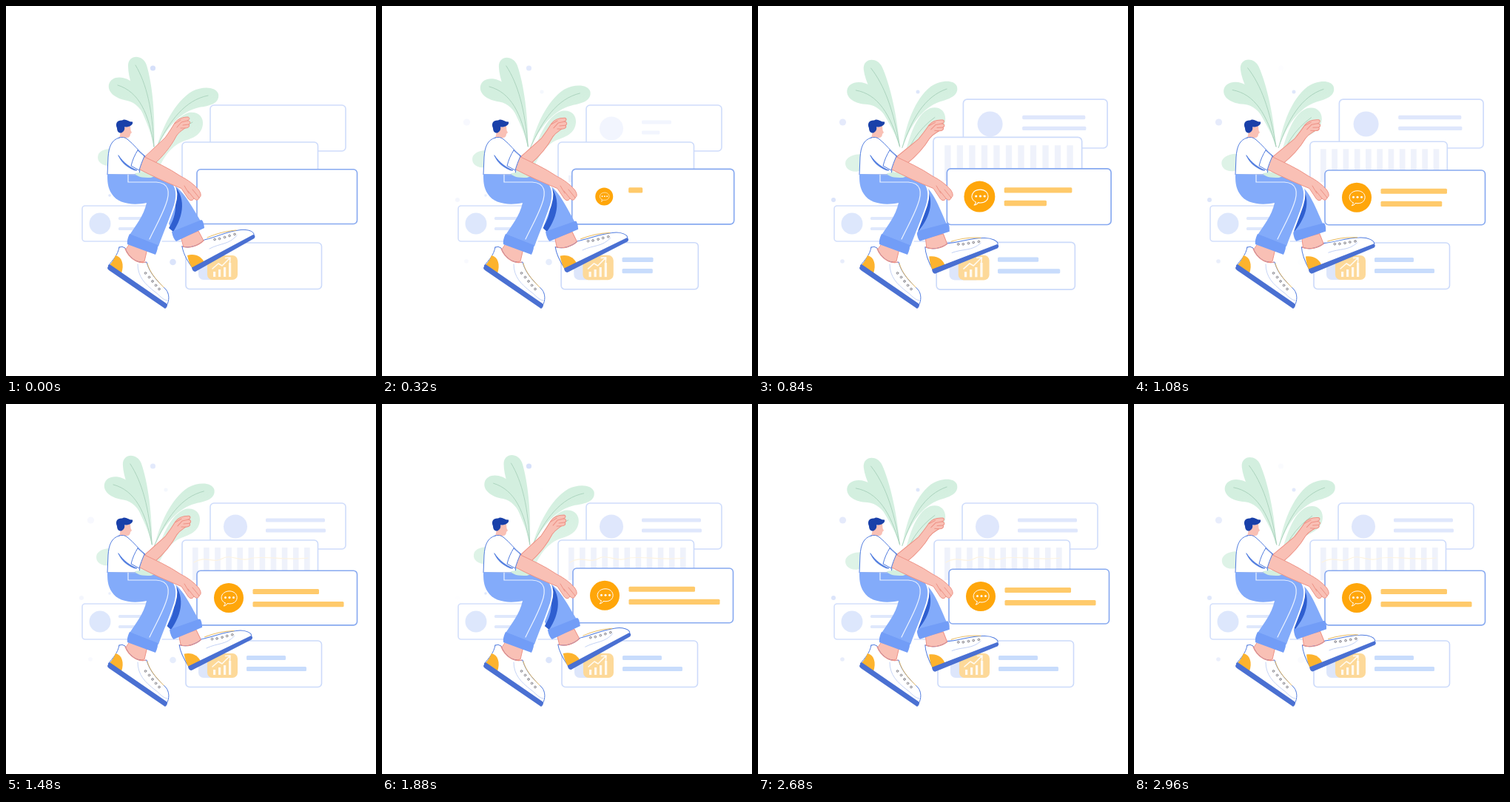
An HTML page with a canvas that plays this animation: 500 by 500 pixels, repeating every 3 s.

```html
<!DOCTYPE html>
<html lang="en">
<head>
<meta charset="utf-8">
<title>Floating cards</title>
<style>
html, body { margin: 0; width: 100%; height: 100%; overflow: hidden; background: #fff; }
canvas { display: block; width: 100vw; height: 100vh; }
</style>
</head>
<body>
<canvas id="stage"></canvas>
<script>
const SIZE = 500, LOOP = 3000, STEP = 40;
const canvas = document.getElementById('stage');
const ratio = Math.max(1, window.devicePixelRatio || 1);
canvas.width = canvas.height = SIZE * ratio;
const ctx = canvas.getContext('2d');

const SKIN = '#f9c0b5', SKIN_LINE = '#ee9286', BLUE = '#4f7bdf';
const JEANS = '#83abfa', CUFF = '#729df7', FOLD = '#2f5fd0';
const SOLE = '#4a70d2', AMBER = '#fdb32e', LEAF = '#d3efdf', VEIN = '#a9d2bc';

const clamp = v => Math.min(1, Math.max(0, v));
const ramp = (t, a, b) => clamp((t - a) / (b - a));
const ease = v => (1 - Math.cos(Math.PI * clamp(v))) / 2;
const hump = (t, a, b) => Math.sin(Math.PI * ramp(t, a, b)) ** 2;

// 1 at the upper pose, 0 at the lower one, with a short rest below
function sway(t) {
  const p = t % 1800;
  return p < 900 ? 1 - ease(p / 840) : ease((p - 960) / 840);
}

function shape(d, fill, stroke, width = 1) {
  const path = new Path2D(d);
  if (fill) { ctx.fillStyle = fill; ctx.fill(path); }
  if (stroke) { ctx.strokeStyle = stroke; ctx.lineWidth = width; ctx.stroke(path); }
}

function disc(x, y, r, fill, stroke, width = 1) {
  ctx.beginPath();
  ctx.arc(x, y, r, 0, Math.PI * 2);
  if (fill) { ctx.fillStyle = fill; ctx.fill(); }
  if (stroke) { ctx.strokeStyle = stroke; ctx.lineWidth = width; ctx.stroke(); }
}

function box(x, y, w, h, r, fill, stroke, width = 1.6) {
  ctx.beginPath();
  ctx.roundRect(x, y, w, h, r);
  if (fill) { ctx.fillStyle = fill; ctx.fill(); }
  if (stroke) { ctx.strokeStyle = stroke; ctx.lineWidth = width; ctx.stroke(); }
}

function bar(x, y, w, h, fill) {
  if (w > 0.5) box(x, y - h / 2, w, h, Math.min(1.5, w / 2), fill);
}

function group(draw, { alpha = 1, x = 0, y = 0, px = 0, py = 0, scale = 1, turn = 0 } = {}) {
  ctx.save();
  ctx.globalAlpha *= alpha;
  ctx.translate(px + x, py + y);
  ctx.rotate(turn * Math.PI / 180);
  ctx.scale(scale, scale);
  ctx.translate(-px, -py);
  draw();
  ctx.restore();
}

function sideCard() {
  box(103, 270, 137, 48, 4, '#fff', '#d3dffb');
  disc(127, 294, 14.5, '#dde7fc');
  bar(152, 287, 50, 4, '#dfe8fc');
  bar(152, 301, 50, 4, '#dfe8fc');
}

function profileCard(t) {
  const k = hump(t, 480, 1440);
  group(() => {
    box(276, 134, 183, 62, 5, '#fff', '#cfdcfb');
    group(() => {
      disc(310, 165.5, 16, '#dfe7fc');
      bar(351, 157, 80 * ramp(t, 120, 520), 5, '#dfe7fc');
      bar(351, 171, 81 * ramp(t, 200, 600), 5, '#dfe7fc');
    }, { alpha: ramp(t, 160, 560) });
  }, { px: 367.5, py: 165, scale: 1 + 0.075 * k, x: 8.5 * k, y: -7 * k });
}

function chartCard(t) {
  const k = hump(t, 400, 1160);
  group(() => {
    box(238, 184, 183.5, 62, 5, '#fff', '#cddbfa');
    for (let i = 0; i < 11; i++) {
      const h = 44 * ease(ramp(t, 200 + (i % 2) * 60, 600 + (i % 2) * 60));
      ctx.fillStyle = '#eff2fb';
      ctx.fillRect(252 + i * 15.1, 238 - h, 7.6, h);
    }
    group(() => shape('M254 214 C270 204 280 216 292 209 S316 214 330 209 S380 212 408 208', null, '#fdf3e0', 1.2),
      { alpha: ramp(t, 1100, 1400) });
  }, { px: 329.5, py: 215, scale: 1 + 0.1 * k, x: 8 * k, y: -4 * k });
}

function bubble() {
  shape('M296 264.500 C287 260 291 248.500 302 248.500 C315 248.500 316 265.500 302 265.500 L299 265.200 C298 267.500 296 268.500 294 268.500 C296 267 296.500 266 296 264.500 Z', null, '#fff', 1);
  for (const x of [296.5, 302, 307.5]) disc(x, 257, 1.5, '#fff');
}

function messageCard(t) {
  const k = hump(t, 240, 960);
  const drift = t < 740 ? 0 : 4.4 * Math.abs(Math.sin(Math.PI * (t - 740) / 1480)) ** 3;
  group(() => {
    box(258, 220.8, 216.5, 73.7, 5, '#fff', '#87a9f0', 1.6);
    group(() => {
      disc(301, 257.5, 20, '#ffa60a');
      bubble();
    }, { px: 301, py: 257.5, scale: ease(ramp(t, 120, 480)) * (1 + 0.09 * k) });
    bar(333.5, 249, 89.5 * ramp(t, 200, 770), 7, '#ffca6b');
    bar(333.5, 266.2, 123 * ramp(t, 340, 1440), 7.2, '#ffca6b');
  }, { px: 366.5, py: 257.5, scale: 1 + 0.098 * k, y: drift });
}

function statsCard(t) {
  const k = hump(t, 240, 960);
  group(() => {
    box(243, 320, 183.5, 62.5, 5, '#fff', '#ccdafa');
    box(260, 344, 42, 26, 7, '#dde6fb');
    box(272, 337, 41, 33, 7, '#fdd999');
    ctx.fillStyle = '#fffaf0';
    [7, 10, 13, 19].forEach((h, i) => ctx.fillRect(280 + i * 7, 366 - h, 3.2, h));
    shape('M279 355 L287 348 L292 351 L302 341 M296.5 340.5 L303 340 L302.5 346.5', null, '#fffaf0', 1.6);
    group(() => {
      bar(325, 343, 53 * ramp(t, 40, 400), 6, '#c8dcfc');
      bar(325, 358, 81 * ramp(t, 120, 520), 6, '#c8dcfc');
    }, { px: 365.5, py: 351, scale: 1 + 0.08 * k });
  }, { px: 334.7, py: 351.2, scale: 1 + 0.08 * k });
}

function dots(s) {
  group(() => {
    disc(198.5, 84, 3.6, '#d6e0fa');
    disc(225.5, 346, 4.3, '#dbe4fb');
    disc(140, 256, 1.8, '#dfe7fb');
  }, { alpha: s });
  group(() => {
    disc(114.5, 157, 4.6, '#e5eafb');
    disc(102, 262, 3, '#dbe4fa');
    disc(216, 116, 2.5, '#dde6fa');
    disc(114, 345, 2.8, '#e8edfb');
  }, { alpha: 1 - s });
}

function leaves(s) {
  group(() => {
    const tint = ctx.createLinearGradient(0, 120, 0, 200);
    tint.addColorStop(0, LEAF);
    tint.addColorStop(1, '#def3e7');
    const blades = [
      'M200 192 C196 158 165 114 165 81 C165 65 185 65 190 80 C198 106 202 150 200 192 Z',
      'M200 192 C195 166 187 133 164 128 C147 125 137 116 139 106 C142 94 160 93 173 105 C190 122 198 155 200 192 Z',
      'M203 193 C211 164 228 129 252 115 C266 108 284 109 287 119 C289 132 275 135 261 137 C237 142 217 164 203 193 Z',
      'M200 215 C213 182 226 150 247 144 C260 142 267 150 266 160 C264 176 250 179 239 183 C222 190 210 207 202 232 L178 232 C190 226 196 222 200 215 Z',
      'M192 236 C176 221 160 214 138 216 C126 215 122 207 125 200 C132 190 149 192 162 198 C180 207 190 222 192 236 Z'
    ];
    blades.forEach(d => shape(d, tint));
    shape('M175 80 C190 105 198 140 200 190 M151 107 C180 116 193 145 200 190 M273 121 C242 127 221 155 203 192 M252 157 C228 170 211 190 200 218', null, VEIN, 0.9);
  }, { px: 195, py: 255, turn: -7.4 * (1 - s) });
}

function rearArm(s) {
  group(() => {
    shape('M183 208 L215 178 C220 171 224 165 228 158 C232 152 240 150 246 150 C249 151 248 154 245 155 C249 155 250 158 247 160 C249 163 246 165 242 165 C238 168 234 170 230 176 C223 190 211 204 200 214 Z', SKIN, SKIN_LINE);
    shape('M245 155 L237 157 L231 164 M247 160 L239 161 M228 159 L236 154 M242 165 L236 165', null, SKIN_LINE, 1);
  }, { px: 190, py: 205, turn: 4 * (1 - s) });
}

function laces(points) {
  for (const [x, y] of points) disc(x, y, 1.4, '#e9e2dc', '#777a88', 0.8);
}

function rearLeg(s) {
  group(() => {
    shape('M215 238 C236 240 249 268 264 292 L229 312 C224 302 220 295 216 285 Z', JEANS);
    shape('M223 238 C245 257 240 284 226 305 L220 300 C232 281 232 260 220 242 Z', FOLD);
    shape('M237 313 L260 304 L267 317 C258 327 248 330 240 325 Z', SKIN, SKIN_LINE);
    shape('M224 305 L264 289 Q267 290 268 300 L230 318 Q226 315 224 305 Z', CUFF);
    shape('M238 325 C240 337 247 347 252 354 L335 310 C336 304 325 301 314 303 C298 305 282 313 268 316 C260 324 248 328 238 325 Z', '#fff', BLUE);
    shape('M239 325 C248 328 260 324 267 317', null, SKIN_LINE, 1.2);
    shape('M245 337 C256 334 265 339 268 347 L252 355 Q247 347 245 337 Z', AMBER);
    shape('M272 313 C285 307 299 304 311 303', null, '#e9bb62', 1);
    shape('M275 328 C290 320 301 323 312 310', null, '#b6c8f2', 0.8);
    laces([[282, 315.5], [288.5, 314.5], [295.5, 312.5], [302, 310.5], [309, 308.5]]);
    shape('M251 353.5 L334 309 Q338 310 335.500 314 L256 359 Q252 359 251 353.500 Z', SOLE);
  }, { px: 226, py: 230, turn: 7.3 * (1 - s) });
}

function head() {
  shape('M156 165 L168 162 L168.5 168 L170 171 L168 173 Q168 178 163 178 L161 182 L153 179 Z', SKIN);
  shape('M150 165 C147 158 151 154 157 154.500 C161 151 166 157 171 156.500 C172.500 161 166 164 160 163.500 C161 167 159 170 156 171.500 C152 172 150 169 150 165 Z', '#1940a9');
}

function torso() {
  shape('M153 178 C142 181 139 191 138 204 L137 228 L180 228 L181 220 L188 203 C180 197 172 186 164 180 C160 177 157 177 153 178 Z', '#fff', BLUE);
  shape('M152 202 C159 212 167 218 177 222 L174 222 C164 218 156 212 152 202 Z', BLUE, BLUE, 0.8);
}

function frontLeg() {
  shape('M169 319 L191 328 L187 345 C177 348 166 341 161 331 Z', SKIN, SKIN_LINE);
  shape('M204 230 C225 232 234 247 227 269 C220 290 212 308 206 325', null, '#fff', 4);
  shape('M137 227 L204 230 C225 232 234 247 227 269 C220 290 212 308 206 325 L166 311 C175 297 186 284 190 266 C171 270 151 267 143 254 C137 245 137 236 137 227 Z', JEANS);
  shape('M174 226 C177 231 183 232 196 232 L203 229 L190 224 Z', LEAF);
  shape('M165 228 L165 238 L203 238 C221 239 222 252 216 268 C210 285 201 300 194 315', null, '#eaf2ff', 1.2);
  shape('M167 308 L205 323 Q206 327 202 336 L164 322 Q163 316 167 308 Z', CUFF);
  shape('M153 326 C151 337 144 344 138 351 L217 405 C221 398 221 389 216 383 C206 373 194 362 190 346 C179 349 166 341 161 327 Q157 324 153 326 Z', '#fff', BLUE);
  shape('M161 328 C166 341 179 349 189 346', null, SKIN_LINE, 1.2);
  shape('M148 337 C157 339 160 350 156 361 L140 350 Q145 345 148 337 Z', AMBER);
  shape('M191 348 C194 360 204 371 213 380', null, '#e9bb62', 1);
  shape('M178 349 C178 366 188 376 201 386 C208 391 211 397 218 398', null, '#b6c8f2', 0.8);
  laces([[188.5, 361], [193.5, 366.5], [198, 372], [202.5, 377.5], [207, 382.5]]);
  shape('M140 349 L217.5 402.5 Q219 406 215 409 L139 357 Q135 354 140 349 Z', SOLE);
}

function frontArm() {
  shape('M183 202 C202 211 220 219 236 230 C246 235 255 242 260 248 C264 253 264 258 261 259 C260 263 257 263 254 260 C252 264 248 263 246 260 L237 246.500 C218 239 198 230 179 220 Z', SKIN, SKIN_LINE);
  shape('M261 259 L252 248 M254 260 L246 250 M241 243 L247 253', null, SKIN_LINE, 1);
  shape('M178 195 L187 203 C184 210 182 215 180 222 L169 216 C171 208 174 201 178 195 Z', '#fff', BLUE);
}

function render(t) {
  ctx.setTransform(ratio, 0, 0, ratio, 0, 0);
  ctx.fillStyle = '#fff';
  ctx.fillRect(0, 0, SIZE, SIZE);
  ctx.lineJoin = ctx.lineCap = 'round';
  const s = sway(t);
  sideCard();
  profileCard(t);
  chartCard(t);
  statsCard(t);
  messageCard(t);
  dots(s);
  leaves(s);
  rearArm(s);
  rearLeg(s);
  head();
  torso();
  frontLeg();
  frontArm();
}

function tick() {
  const t = performance.now() % LOOP;
  render(Math.floor(t / STEP) * STEP);
  requestAnimationFrame(tick);
}
tick();
</script>
</body>
</html>
```
